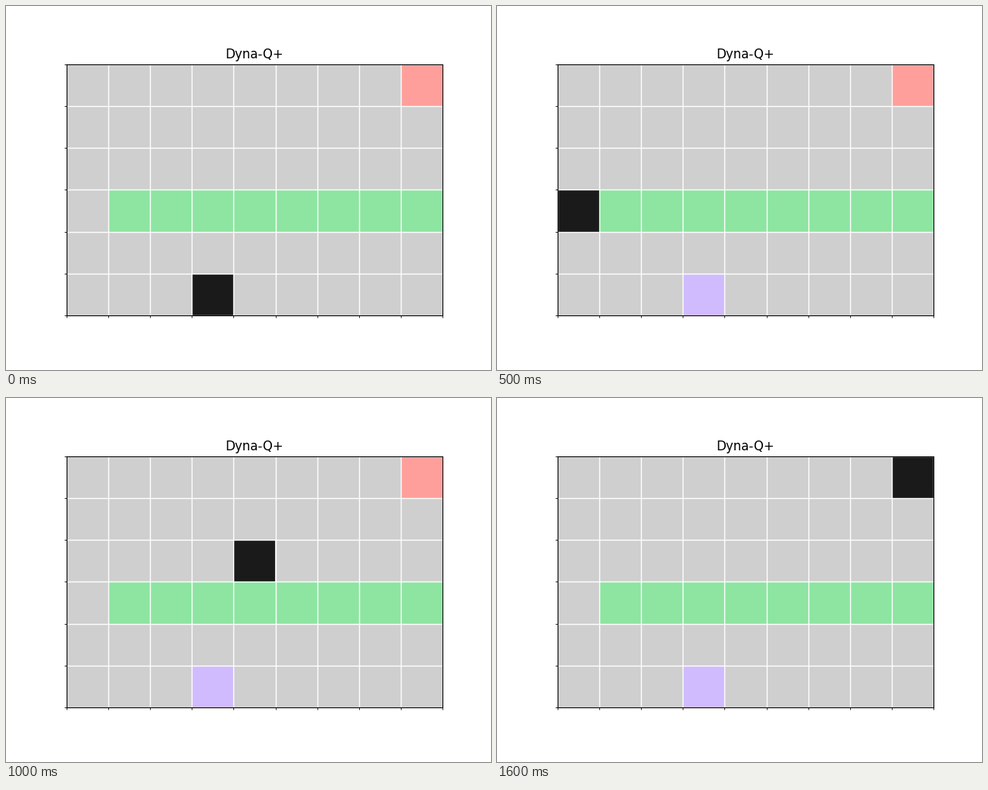
Animation, 640 px wide and 480 px high, one loop 1.7 s. Source, as a matplotlib script:

```python
import numpy as np
import matplotlib.pyplot as plt
from matplotlib.animation import FuncAnimation
from matplotlib.colors import ListedColormap

ROWS, COLS = 6, 9
FLOOR, WALL, START, GOAL, AGENT = range(5)
COLORS = ["#cfcfcf", "#8de5a1", "#d0bbff", "#ff9f9b", "#1a1a1a"]
MOVES = {"L": (0, -1), "R": (0, 1), "U": (-1, 0)}
ROUTE = "LULLUURRRRRRRURU"

maze = np.full((ROWS, COLS), FLOOR)
maze[3, 1:] = WALL
maze[5, 3] = START
maze[0, 8] = GOAL

# Cells visited by the agent, one per frame
path = [(5, 3)]
for move in ROUTE:
    dr, dc = MOVES[move]
    r, c = path[-1]
    path.append((r + dr, c + dc))

fig, ax = plt.subplots(figsize=(6.4, 4.8), dpi=100)
image = ax.imshow(maze, cmap=ListedColormap(COLORS), vmin=0, vmax=4,
                  interpolation="nearest")
ax.set_title("Dyna-Q+")
ax.set_xticks([])
ax.set_yticks([])
ax.set_xticks(np.arange(COLS + 1) - 0.5, minor=True)
ax.set_yticks(np.arange(ROWS + 1) - 0.5, minor=True)
ax.grid(which="minor", color="white", linewidth=1)


def update(frame):
    state = maze.copy()
    state[path[frame]] = AGENT
    image.set_data(state)
    return [image]


anim = FuncAnimation(fig, update, frames=len(path), interval=100,
                     repeat=True, repeat_delay=0)
plt.show()
```
